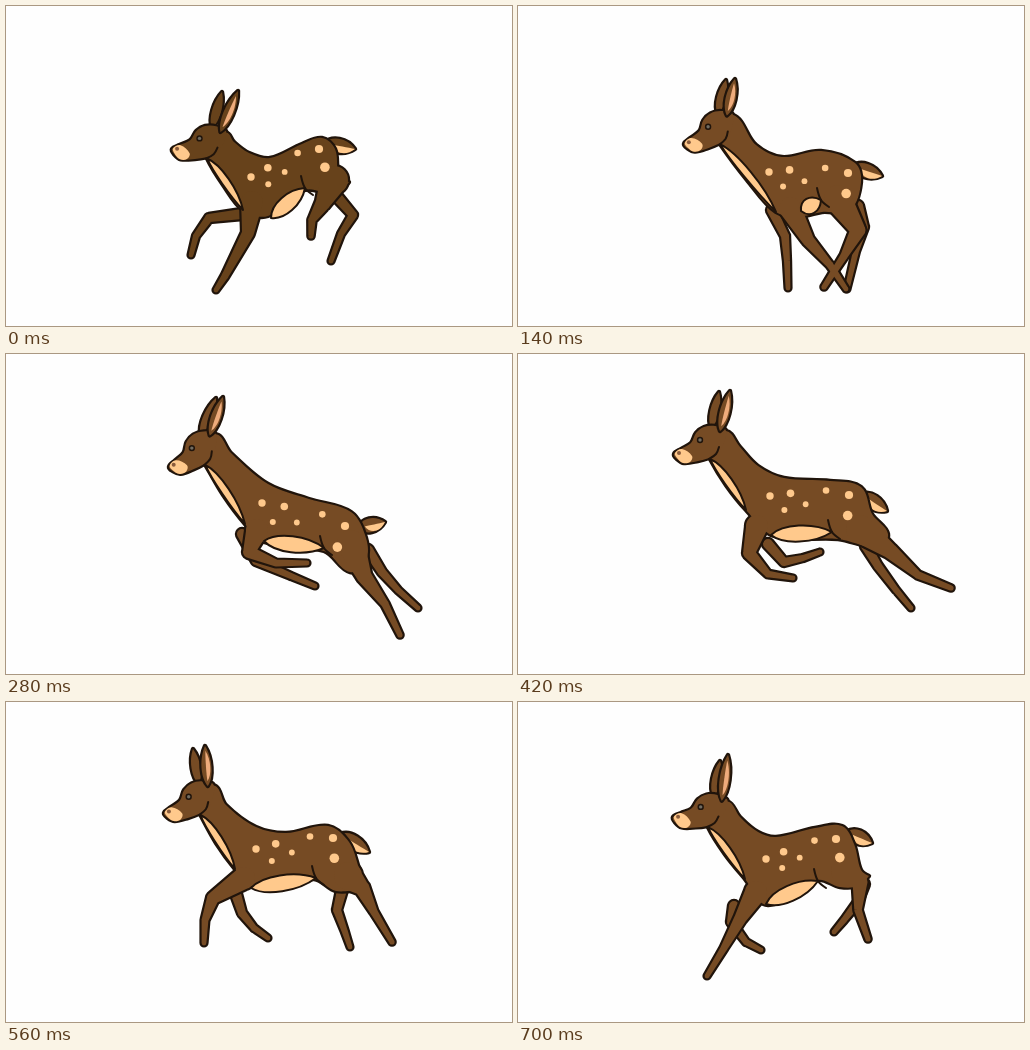
Write an HTML page with a canvas that moves like this. It is 506 by 320 pixels and loops after 0.84 s.

```html
<!DOCTYPE html>
<html lang="en">
<head>
<meta charset="utf-8">
<title>Running fawn</title>
<style>
  html, body { margin: 0; width: 100%; height: 100%; overflow: hidden; background: #fefefe; }
  canvas { display: block; }
</style>
</head>
<body>
<canvas id="stage" width="506" height="320"></canvas>
<script>
const ctx = document.getElementById('stage').getContext('2d');
const POSE_MS = 140;
const FUR = '#764b24', CREAM = '#ffc98c', INNER_EAR = '#efac7c', INK = '#20140b';

const points = text => text.split(',').map(p => p.trim().split(' ').map(Number));

// Parts shared by all poses. The head is measured from the nose tip.
const HEAD = points('1 0, 8 -5, 18 -11, 23 -21, 31 -27, 42 -28, 53 -23, 45 0, 36 4, 25 7, 11 9, 4 5');
const MUZZLE = points('2 -1, 9 -5, 19 2, 17 8, 10 9, 4 4');
const CHEEK = points('46 -7, 43 0, 36 5');
const [NOSE, EYE, NAPE, THROAT, SKULL, FAR_EAR, NEAR_EAR] =
  points('6 -1, 27 -14, 53 -23, 37 5, 30 -12, 38 -26, 47 -23');
// Spots lie along the flank line, in units of its length.
const SPOTS = points('0 0 3.7, .26 -.03 3.8, .18 .18 3, .45 .11 2.9, .71 -.06 3.3, 1 0 4.1, .98 .26 4.8');
// Half widths from the top joint to the hoof.
const WIDTHS = { front: [11, 6, 3.4, 2.4], hind: [14, 7.5, 3.7, 2.6], far: [5, 4, 3, 2.4] };

// head: nose and tilt in degrees; ears: far and near tips; trunk: nape to brisket;
// tail, belly and flank: start and end; legs: joints of far and near legs.
const poses = [
  { // reaching forward
    fur: '#67421b',
    head: [165, 143, 7], ears: '216 86, 232 85', tail: '318 137, 349 143',
    trunk: '228 136, 243 147, 264 152, 296 138, 316 132, 329 143, 333 170, 343 176, 328 188, 299 184, 262 210, 237 204',
    belly: '265 212, 299 182', flank: '245 171, 313 143',
    farFront: '236 208, 203 212, 190 230, 185 249', farHind: '332 192, 347 209, 335 228, 325 255',
    front: '246 196, 242 227, 219 270, 210 284', hind: '328 174, 317 197, 306 214, 305 230'
  },
  { // gathered
    head: [165, 138, -7], ears: '208 74, 217 73', tail: '334 160, 364 170',
    trunk: '238 139, 264 151, 303 145, 337 157, 343 176, 332 204, 304 206, 284 210, 258 206',
    belly: '283 205, 303 194', flank: '251 166, 330 167',
    farFront: '254 204, 267 230, 269 255, 270 282', farHind: '340 200, 346 221, 338 245, 329 283',
    front: '272 202, 290 234, 312 259, 328 283', hind: '320 193, 340 224, 326 250, 306 281'
  },
  { // leaping
    head: [162, 113, -11], ears: '210 44, 217 43', tail: '352 174, 379 168',
    trunk: '225 99, 262 130, 303 145, 345 158, 360 184, 360 206, 344 218, 318 197, 258 188, 239 170',
    belly: '258 187, 318 194', flank: '256 149, 339 172',
    farFront: '236 180, 250 207, 285 222, 309 232', farHind: '362 196, 376 218, 392 236, 412 254',
    front: '251 176, 243 198, 270 209, 301 209', hind: '345 190, 358 222, 379 250, 394 281'
  },
  { // fully airborne
    head: [155, 100, 0], ears: '201 38, 212 37', tail: '343 140, 369 157',
    trunk: '222 93, 240 112, 266 124, 312 127, 343 133, 354 160, 370 180, 360 193, 320 185, 256 182, 228 156',
    belly: '253 181, 314 178', flank: '252 142, 331 141',
    farFront: '250 190, 266 208, 285 204, 302 198', farHind: '348 192, 360 212, 378 236, 393 254',
    front: '239 172, 231 199, 250 220, 275 224', hind: '342 175, 372 197, 400 221, 433 234'
  },
  { // landing
    head: [157, 111, -5], ears: '187 47, 199 44', tail: '334 132, 363 150',
    trunk: '220 103, 250 125, 280 131, 322 124, 343 140, 353 166, 360 186, 330 189, 308 177, 246 184, 229 167',
    belly: '245 186, 310 176', flank: '250 147, 327 136',
    farFront: '230 192, 236 211, 248 226, 262 236', farHind: '336 188, 331 208, 339 230, 344 245',
    front: '238 176, 207 196, 199 218, 198 241', hind: '342 174, 356 186, 368 210, 386 240'
  },
  { // pushing off the forelegs
    head: [154, 115, 8], ears: '202 59, 210 53', tail: '328 130, 354 141',
    trunk: '222 115, 240 130, 258 135, 297 126, 324 124, 336 142, 343 168, 351 174, 340 184, 322 185, 299 178, 250 203, 227 177',
    belly: '248 202, 300 179', flank: '248 157, 318 137',
    farFront: '216 204, 213 220, 228 240, 243 248', farHind: '346 182, 340 200, 326 218, 316 230',
    front: '238 190, 222 217, 206 246, 189 274', hind: '327 169, 342 180, 340 208, 350 237'
  }
];

const mix = (a, b, t) => [a[0] + (b[0] - a[0]) * t, a[1] + (b[1] - a[1]) * t];

// A point at fraction t from a to b, pushed sideways (clockwise) by offset.
function beside(a, b, t, offset) {
  const [x, y] = mix(a, b, t), length = Math.hypot(b[0] - a[0], b[1] - a[1]) || 1;
  return [x - (b[1] - a[1]) / length * offset, y + (b[0] - a[0]) / length * offset];
}

// Smooth curve through the points; sharp turns stay corners.
function curve(pts, closed = true) {
  const n = pts.length, path = new Path2D();
  const at = i => closed ? pts[(i + n) % n] : pts[Math.max(0, Math.min(n - 1, i))];
  const tangent = i => {
    const [a, b, c] = [at(i - 1), at(i), at(i + 1)];
    const dot = (b[0] - a[0]) * (c[0] - b[0]) + (b[1] - a[1]) * (c[1] - b[1]);
    const span = Math.hypot(c[0] - a[0], c[1] - a[1]) || 1;
    return dot <= 0 ? [0, 0] : [(c[0] - a[0]) / span, (c[1] - a[1]) / span];
  };
  path.moveTo(...pts[0]);
  for (let i = 0; i < (closed ? n : n - 1); i++) {
    const a = at(i), b = at(i + 1), ta = tangent(i), tb = tangent(i + 1);
    const k = Math.hypot(b[0] - a[0], b[1] - a[1]) / 3;
    path.bezierCurveTo(a[0] + ta[0] * k, a[1] + ta[1] * k, b[0] - tb[0] * k, b[1] - tb[1] * k, ...b);
  }
  if (closed) path.closePath();
  return path;
}

// Pointed shape from a to b, bulging by the given amounts on each side.
function leaf(a, b, left, right) {
  const path = new Path2D();
  path.moveTo(...a);
  path.bezierCurveTo(...beside(a, b, 0.2, -left * 4 / 3), ...beside(a, b, 0.7, -left * 4 / 3), ...b);
  path.bezierCurveTo(...beside(a, b, 0.7, right * 4 / 3), ...beside(a, b, 0.2, right * 4 / 3), ...a);
  path.closePath();
  return path;
}

// Jointed leg, tapering between circles.
function limb(text, widths) {
  const path = new Path2D(), joints = points(text);
  joints.forEach((a, i) => {
    path.moveTo(a[0] + widths[i], a[1]);
    path.arc(...a, widths[i], 0, Math.PI * 2);
    const b = joints[i + 1];
    if (!b) return;
    path.moveTo(...beside(a, b, 0, -widths[i]));
    path.lineTo(...beside(a, b, 1, -widths[i + 1]));
    path.lineTo(...beside(a, b, 1, widths[i + 1]));
    path.lineTo(...beside(a, b, 0, widths[i]));
    path.closePath();
  });
  return path;
}

function fill(path, color) {
  ctx.fillStyle = color;
  ctx.fill(path);
}

function ink(path, width = 2) {
  ctx.lineWidth = width;
  ctx.stroke(path);
}

// Joined parts share one outline.
function merge(parts, color) {
  parts.forEach(part => ink(part, 4.4));
  parts.forEach(part => fill(part, color));
}

function patch(path, color) {
  fill(path, color);
  ink(path);
}

function dot([x, y], radius, color) {
  ctx.fillStyle = color;
  ctx.beginPath();
  ctx.arc(x, y, radius, 0, Math.PI * 2);
  ctx.fill();
}

function drawFawn(pose) {
  const fur = pose.fur || FUR;
  const [noseX, noseY, tilt] = pose.head;
  const cos = Math.cos(tilt * Math.PI / 180), sin = Math.sin(tilt * Math.PI / 180);
  const onHead = ([x, y]) => [noseX + x * cos - y * sin, noseY + x * sin + y * cos];
  const [farTip, nearTip] = points(pose.ears), [tailRoot, tailTip] = points(pose.tail);
  const [bellyStart, groin] = points(pose.belly), [flankStart, flankEnd] = points(pose.flank);
  const trunk = points(pose.trunk), throat = onHead(THROAT), brisket = trunk.at(-1);
  const nearBase = onHead(NEAR_EAR);

  merge([leaf(tailRoot, tailTip, 7, 7)], fur);
  fill(leaf(mix(tailRoot, tailTip, 0.25), tailTip, 0, 6.5), CREAM);
  merge([limb(pose.farFront, WIDTHS.far)], fur);
  merge([limb(pose.farHind, WIDTHS.far)], fur);
  merge([leaf(onHead(FAR_EAR), farTip, 4.5, 4.5)], fur);

  const chestEdge = beside(throat, brisket, 0.5, 2);
  const torso = curve([onHead(NAPE), ...trunk, chestEdge, throat, onHead(SKULL)]);
  merge([torso, curve(HEAD.map(onHead)), limb(pose.front, WIDTHS.front), limb(pose.hind, WIDTHS.hind)], fur);

  patch(leaf(throat, brisket, 6, 2), CREAM);
  patch(leaf(bellyStart, groin, 8, 8), CREAM);
  ink(curve([[groin[0] - 4, groin[1] - 12], groin, [groin[0] + 8, groin[1] + 7]], false));
  fill(curve(MUZZLE.map(onHead)), CREAM);
  ink(curve(CHEEK.map(onHead), false));
  merge([leaf(nearBase, nearTip, 5, 5)], fur);
  fill(leaf(mix(nearBase, nearTip, 0.12), mix(nearBase, nearTip, 0.88), 0.5, 3.8), INNER_EAR);

  const length = Math.hypot(flankEnd[0] - flankStart[0], flankEnd[1] - flankStart[1]);
  SPOTS.forEach(([along, down, r]) => dot(beside(flankStart, flankEnd, along, down * length), r, CREAM));
  dot(onHead(NOSE), 2, '#8a5c3c');
  dot(onHead(EYE), 3.2, INK);
  dot(onHead(EYE), 1.7, '#706c62');
}

function draw() {
  ctx.fillStyle = '#fefefe';
  ctx.fillRect(0, 0, 506, 320);
  ctx.strokeStyle = INK;
  ctx.lineJoin = ctx.lineCap = 'round';
  drawFawn(poses[Math.floor(performance.now() / POSE_MS) % poses.length]);
  requestAnimationFrame(draw);
}
draw();
</script>
</body>
</html>
```
